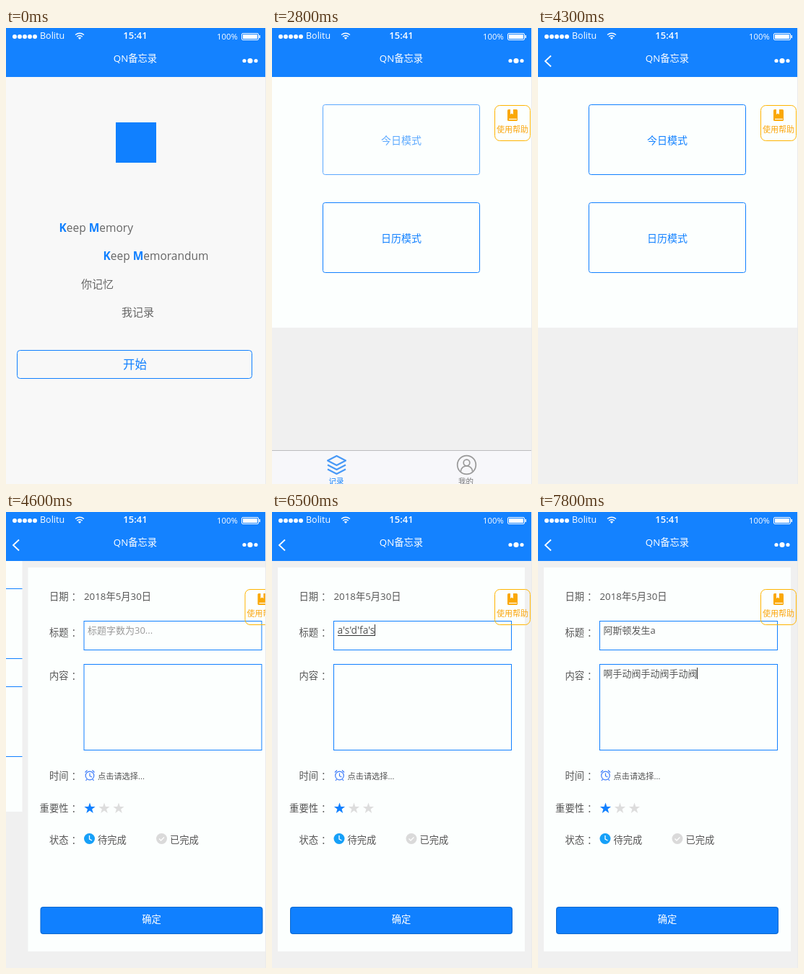
Write an HTML page that moves like this. It is 360 px wide and 633 px high and loops after 8 s.

```html
<!DOCTYPE html>
<html lang="zh">
<head>
<meta charset="utf-8">
<title>Memo app</title>
<style>
html, body { margin: 0; width: 100%; height: 100%; overflow: hidden; background: #f8f8f8; }
svg { display: block; width: 100vw; height: 100vh; }
text { font-family: 'Open Sans', 'Noto Sans CJK SC', 'Noto Sans CJK', sans-serif; white-space: pre; }
.mid { text-anchor: middle; }
.white { fill: #fff; }
.blue { fill: #1080ff; }
.bold { font-weight: 700; }
.medium { font-weight: 500; }
.line { fill: none; stroke: #1080ff; }
.copy { fill: #666; font-size: 15px; }
.latin { font-size: 15.5px; }
.form { fill: #555; font-size: 13.3px; }
.typed { fill: #555; font-size: 13px; }
.ghost text, .ghost tspan { fill: #fff; font-weight: 700; }
.ghost rect { stroke: #fff; }
.ghost .logo { fill: #fff; }
</style>
</head>
<body>
<svg viewBox="0 0 360 633" preserveAspectRatio="none">
  <defs>
    <g id="help">
      <rect x="308.5" y="107.5" width="49" height="49" rx="7" fill="none" stroke="#ffb400"/>
      <rect x="326" y="113" width="14" height="16" rx="1.5" fill="#faa805"/>
      <path d="M330 113h4v7l-2-1.5-2 1.5z" fill="#fff"/>
      <path d="M328 126.5h11" stroke="#fff" stroke-width="1.2"/>
      <text class="mid" x="333" y="145" font-size="11" fill="#faa50a">使用帮助</text>
    </g>
    <path id="star" d="M0-8 1.9-2.6H7.6L3.1.9 4.7 6.4 0 3.1-4.7 6.4-3.1.9-7.6-2.6H-1.9z"/>
  </defs>

  <g id="splash">
    <rect width="360" height="633" fill="#f8f8f8"/>
    <rect class="logo blue" x="152" y="131" width="56" height="56"/>
    <g class="copy">
      <text class="latin" x="73.5" y="283"><tspan class="blue bold">K</tspan>eep <tspan class="blue bold">M</tspan>emory</text>
      <text class="latin" x="134.5" y="322"><tspan class="blue bold">K</tspan>eep <tspan class="blue bold">M</tspan>emorandum</text>
      <text x="104" y="361">你记忆</text>
      <text x="160" y="400">我记录</text>
    </g>
    <rect class="line" x="15.5" y="447.5" width="325" height="39" rx="4"/>
    <text class="mid blue" x="178.5" y="473" font-size="16.5">开始</text>
  </g>

  <g id="modes">
    <rect y="68" width="360" height="565" fill="#f0f0f0"/>
    <rect y="68" width="360" height="348" fill="#fcfffe"/>
    <g id="today">
      <rect class="line" x="70.5" y="106.5" width="217" height="97" rx="3"/>
      <text class="mid blue" x="179" y="160.5" font-size="14">今日模式</text>
    </g>
    <rect class="line" x="70.5" y="242.5" width="217" height="97" rx="3"/>
    <text class="mid blue" x="179" y="296.5" font-size="14">日历模式</text>
    <use href="#help"/>
  </g>

  <g id="form">
    <rect y="68" width="360" height="565" fill="#f0f0f0"/>
    <rect x="8" y="77" width="342" height="533" fill="#fcfffe"/>
    <g id="labels" class="form"></g>
    <g class="form">
      <text x="85.5" y="122">2018年5月30日</text>
      <text x="104.5" y="371" style="font-size:11.2px">点击请选择...</text>
      <text x="104.5" y="460">待完成</text>
      <text x="204.5" y="460">已完成</text>
    </g>
    <rect class="line" x="85.5" y="151.5" width="246" height="40"/>
    <rect class="line" x="85.5" y="211.5" width="246" height="119"/>
    <g fill="none" stroke="#3f7cfa" stroke-width="1.2">
      <circle cx="93.5" cy="366" r="5.8"/>
      <path d="M93.5 362.5v4l3 1.5M87 361.5l3-3M100 361.5l-3-3M89.5 371l-1.5 2M97.5 371l1.5 2"/>
    </g>
    <use href="#star" x="93.5" y="411.5" class="blue"/>
    <use href="#star" x="113.5" y="411.5" fill="#ddd"/>
    <use href="#star" x="133.5" y="411.5" fill="#ddd"/>
    <circle cx="93" cy="453.5" r="7.5" fill="#16a0f8"/>
    <path d="M93 449v5l3.5 2" fill="none" stroke="#fff" stroke-width="1.3"/>
    <circle cx="193" cy="453.5" r="7.5" fill="#dadada"/>
    <path d="M189.5 453.5l2.5 2.5 4.5-4.5" fill="none" stroke="#fff" stroke-width="1.3"/>
    <rect class="blue" x="25" y="548" width="308" height="38" rx="4"/>
    <rect x="25.5" y="548.5" width="307" height="37" rx="4" fill="none" stroke="#000" stroke-opacity=".2"/>
    <text class="mid white medium" x="179" y="570" font-size="13.3">确定</text>
    <text id="title" class="typed" x="90.5" y="169"></text>
    <text id="content" class="typed" x="90.5" y="228.5"></text>
    <path id="under" stroke="#333"/>
    <path id="caret" stroke="#333"/>
    <use href="#help"/>
    <g id="ime"></g>
  </g>

  <g id="tabs">
    <rect y="586" width="360" height="47" fill="#f7f7fa"/>
    <path d="M0 586.5h360" stroke="#bcbcbe"/>
    <g fill="none" stroke="#4798f6" stroke-width="2" stroke-linejoin="round">
      <path d="M89.5 594l12.5 6.5-12.5 6.5-12.5-6.5z"/>
      <path d="M77 606.5l12.5 6.5 12.5-6.5M77 612.5l12.5 6.5 12.5-6.5"/>
    </g>
    <g fill="none" stroke="#999" stroke-width="1.7">
      <circle cx="269.5" cy="606.5" r="12.8"/>
      <circle cx="269.5" cy="603.5" r="4.3"/>
      <path d="M261.5 615.5c0-10 16-10 16 0"/>
    </g>
    <text class="mid" x="89" y="633" font-size="10.5" fill="#1684fb">记录</text>
    <text class="mid" x="268.5" y="633" font-size="10.5" fill="#777">我的</text>
  </g>

  <g id="header">
    <rect width="360" height="68" fill="#1482ff"/>
    <g id="signal" class="white"></g>
    <text class="white" x="47" y="15" font-size="12.5">Bolitu</text>
    <path d="M96 9.5q6-4.500 12 0M98.200 12q3.800-3 7.600 0" fill="none" stroke="#fff" stroke-width="1.5"/>
    <path class="white" d="M99.8 13.5q2.200-1.500 4.400 0l-2.200 2.500z"/>
    <text class="mid white" x="179" y="15" font-size="13" font-weight="600">15:41</text>
    <text class="white medium" x="292" y="16" font-size="11.3">100%</text>
    <rect x="326.5" y="7.5" width="23" height="9" rx="1.5" fill="none" stroke="#fff"/>
    <rect class="white" x="328" y="9" width="20" height="6"/>
    <rect class="white" x="350.5" y="10" width="1.5" height="4"/>
    <text class="mid white medium" x="179" y="47" font-size="13.3">QN备忘录</text>
    <g class="white">
      <circle cx="330" cy="45.5" r="2.6"/><circle cx="338" cy="45.5" r="3.6"/><circle cx="346" cy="45.5" r="2.6"/>
    </g>
    <path id="back" d="M18 38.5l-8 7.5 8 7.5" fill="none" stroke="#fff" stroke-width="1.8"/>
  </g>
  <path d="M359.5 0v633" stroke="#ebebeb"/>
</svg>
<script>
const LOOP = 8000;
const $ = id => document.getElementById(id);
const show = (id, on) => $(id).setAttribute('display', on ? 'inline' : 'none');
const put = (id, attrs) => { for (const k in attrs) $(id).setAttribute(k, attrs[k]); };

for (let i = 0; i < 5; i++) {
  $('signal').innerHTML += `<circle cx="${12 + i * 7}" cy="12" r="3"/>`;
}

const labels = { 日期: 122, 标题: 172, 内容: 232, 时间: 371, 重要性: 416, 状态: 460 };
for (const name in labels) {
  const x = 64 - name.length * 13.3;
  $('labels').innerHTML += `<text x="${x}" y="${labels[name]}">${name}<tspan dx="4">：</tspan></text>`;
}

// Start time, pinyin, candidates
const titleKeys = [
  [5800, "a's", '阿三 阿萨 阿斯'],
  [5900, "a's'd", '阿斯顿 阿斯蒂 阿三'],
  [6000, "a's'd'f", '阿斯顿发 阿斯蒂芬 阿三'],
  [6200, "a's'd'fa", '阿斯顿发 阿斯蒂 阿三'],
  [6300, "a's'd'fa's", '阿斯顿发生 阿斯顿 阿斯'],
  [6500, "a's'd'fa's", '']
];
const letters = 'asdfsdfsdf';
const phrase = '啊手动阀手动阀手动阀';

// Text, composition and candidates of both fields at time t
function typing(t) {
  if (t < 5800) return { title: '', content: '', row: t < 5300 ? -1 : 0 };
  if (t < 6600) {
    const [, title, words] = titleKeys.filter(k => k[0] <= t).pop();
    return { title, content: '', row: 0, composing: true, words };
  }
  const title = '阿斯顿发生a';
  if (t < 7000) return { title, content: '', row: 0 };
  if (t >= 7800) return { title, content: phrase, row: 1 };
  const n = Math.min(10, 1 + Math.ceil((t - 7000) / 100 * 1.5));
  const words = [phrase.slice(0, n), n > 3 ? '阿斯蒂芬' : '阿', '啊'].join(' ');
  return { title, content: [...letters.slice(0, n)].join("'"), row: 1, composing: true, words };
}

function candidates(words, y) {
  let x = 104;
  let out = `<rect x="104.5" y="${y + .5}" width="270" height="43" fill="#fff" stroke="#5aa6e4"/>`;
  words.split(' ').forEach((word, i) => {
    const w = word.length * 17.5 + (i ? 46 : 47);
    if (!i) out += `<rect x="${x}" y="${y}" width="${w}" height="44" fill="#56a3e3"/>`;
    out += `<text x="${x + 16.5}" y="${y + 28}" font-size="13" fill="${i ? '#888' : '#fff'}">${i + 1}</text>`
      + `<text x="${x + 31}" y="${y + 29}" font-size="17.5" fill="${i ? '#333' : '#fff'}">${word}</text>`;
    x += w;
  });
  return out;
}

function drawFields(t) {
  const s = typing(t);
  const empty = t < 5800;
  const field = $(s.row === 1 ? 'content' : 'title');
  $('title').textContent = empty ? '标题字数为30...' : s.title;
  $('title').style.fill = empty ? '#999' : '#555';
  $('content').textContent = s.content;
  $('title').style.fontSize = $('content').style.fontSize = '13px';
  if (s.composing) field.style.fontSize = '13.8px';
  show('caret', s.row >= 0);
  show('under', s.composing);
  show('ime', s.words);
  if (s.row < 0) return;

  const y = 156 + s.row * 60;
  const w = empty ? 0 : Math.round(field.getComputedTextLength());
  put('caret', { d: `M${90.5 + w} ${y}v16` });
  put('under', { d: `M91 ${y + 15.5}h${w}` });
  if (s.words) $('ime').innerHTML = candidates(s.words, y + 19);
}

function draw(time) {
  const t = Math.floor(time / 100) * 100;
  const slide = Math.min(1, Math.max(0, (t - 4300) / 400));
  const away = (1 - slide) ** 2;

  show('splash', t < 2100);
  $('splash').setAttribute('class', t >= 1500 ? 'ghost' : '');
  show('modes', t >= 2100 && slide < 1);
  put('modes', { transform: `translate(${-108 * (1 - away)} 0)` });
  put('today', { opacity: t >= 2800 && t < 3100 ? .68 : 1 });
  show('tabs', t >= 1500 && t < 2900);
  show('back', t >= 2900);
  show('form', slide > 0);
  put('form', { transform: `translate(${360 * away} 0)` });
  if (slide > 0) drawFields(t);
}

const start = performance.now();
function tick() {
  draw((performance.now() - start) % LOOP);
  requestAnimationFrame(tick);
}
tick();
</script>
</body>
</html>
```
